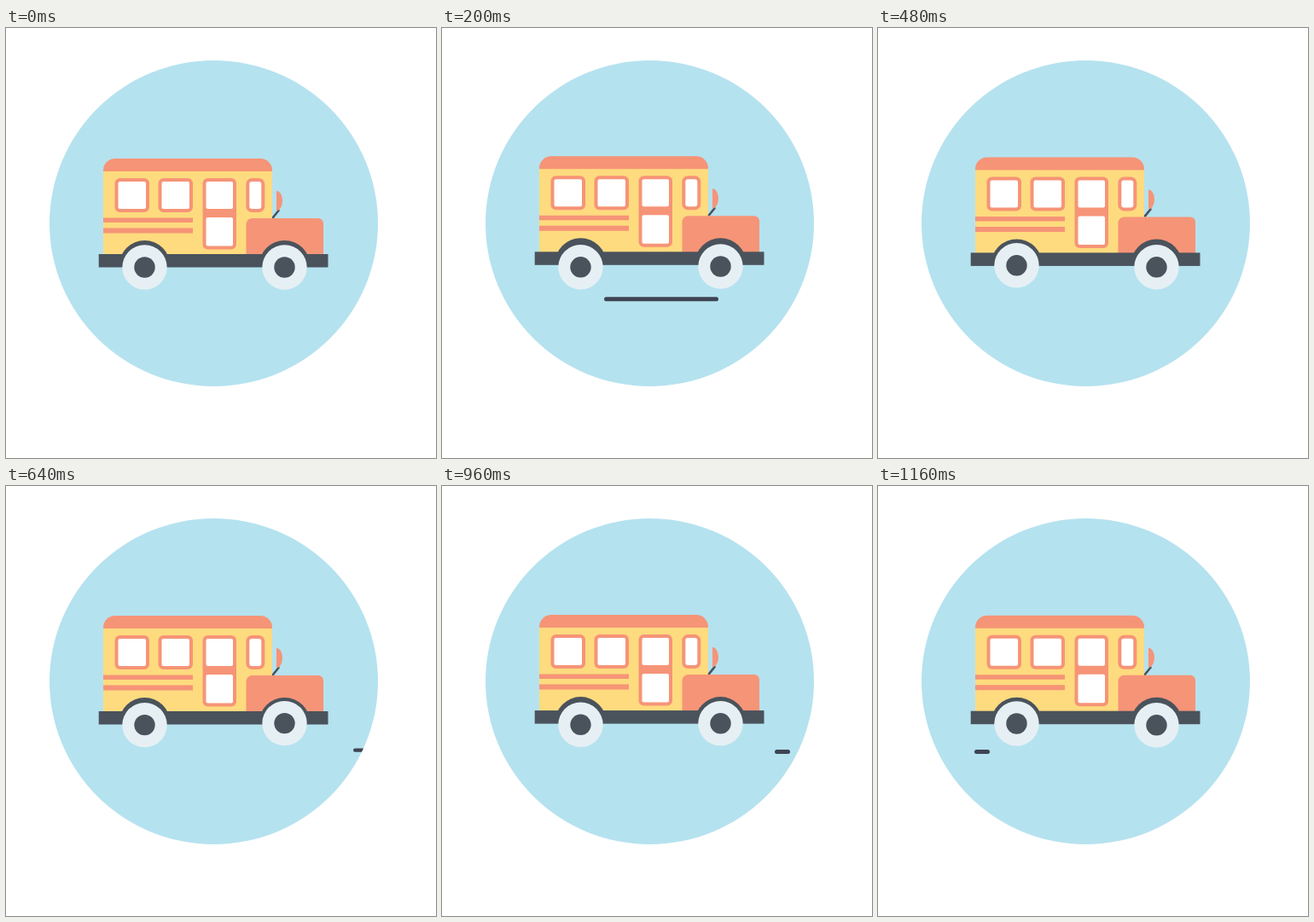
Animation, 504 px wide and 504 px high, one loop 1.2 s. Source, as an HTML page:

```html
<!DOCTYPE html>
<html lang="en">
<head>
<meta charset="utf-8">
<title>School bus</title>
<style>
  html, body { margin: 0; width: 100%; height: 100%; overflow: hidden; background: #fff; }
  svg { display: block; width: 100vw; height: 100vh; }
  .coral { fill: #f69477; }
  .dark { fill: #4a535c; }
  .pane { fill: #fff; stroke: #f69477; stroke-width: 4; }
  .road line { stroke: #3f4453; stroke-linecap: round; }
</style>
</head>
<body>
<svg viewBox="0 0 504 504">
  <defs>
    <clipPath id="disc"><ellipse cx="243.5" cy="229" rx="192.5" ry="191"/></clipPath>
    <g id="wheel">
      <circle r="26.2" fill="#e6f0f4"/>
      <circle class="dark" r="12.2"/>
    </g>
    <path id="arch" class="dark" d="M-30 0A30 30 0 0 1 30 0Z"/>
  </defs>
  <ellipse cx="243.5" cy="229" rx="192.5" ry="191" fill="#b5e2ef"/>
  <g class="road" id="road" clip-path="url(#disc)"></g>
  <g id="body">
    <path fill="#fedb7f" d="M114 167H312V266H114Z"/>
    <path class="coral" d="M114 168V167A14 14 0 0 1 128 153H298A14 14 0 0 1 312 167V168Z"/>
    <rect class="pane" x="129.5" y="178" width="36.5" height="36" rx="4"/>
    <rect class="pane" x="180.5" y="178" width="36.5" height="36" rx="4"/>
    <rect class="coral" x="230.5" y="176" width="39.5" height="83.5" rx="6"/>
    <rect x="234.5" y="180" width="31.5" height="32" rx="2" fill="#fff"/>
    <rect x="234.5" y="222" width="31.5" height="33.5" rx="2" fill="#fff"/>
    <rect class="pane" x="283.3" y="178" width="18" height="36" rx="5"/>
    <path class="coral" d="M114 222.5H219V228H114ZM114 234.5H219V240.5H114Z"/>
    <path d="M313 222L319.5 214" stroke="#4a535c" stroke-width="2.6" stroke-linecap="round"/>
    <path class="coral" d="M317 191A7 11.5 0 0 1 317 214Z"/>
    <path class="coral" d="M281.5 266V230A7 7 0 0 1 288.5 223H366A6 6 0 0 1 372 229V266Z"/>
    <rect class="dark" x="108.7" y="265" width="268.8" height="15.5"/>
    <use href="#arch" x="162.5" y="279"/>
    <use href="#arch" x="326.5" y="279"/>
  </g>
  <use id="rear" href="#wheel"/>
  <use id="front" href="#wheel"/>
</svg>
<script>
const LOOP = 1200, STEP = 40;
const $ = id => document.getElementById(id);

// [time, vertical offset]
const bounce = {
  body: [[0, 0], [200, -2.7], [480, -1.6], [640, -1], [800, -1], [960, -1.9], [1160, -1.3], [1200, 0]],
  rear: [[0, 0], [200, -0.2], [480, -2.2], [640, -0.4], [800, -2.2], [960, -0.7], [1160, -2], [1200, 0]],
  front: [[0, 0], [200, -1], [480, -0.2], [640, -2.4], [800, -0.2], [960, -2.2], [1160, -0.2], [1200, 0]]
};

// Each dash is at x when t = at, and moves left at speed px/ms.
const dashes = [
  { at: 200, x: 190, y: 317.7, len: 134, w: 5, speed: 1.77 },
  { at: 640, x: 407, y: 309.7, len: 134, w: 4.2, speed: 1.77 },
  { at: 960, x: 390, y: 311.5, len: 18, w: 5, speed: 1.385 }
];
for (const d of dashes) {
  d.el = document.createElementNS("http://www.w3.org/2000/svg", "line");
  d.el.setAttribute("x1", d.w / 2);
  d.el.setAttribute("x2", d.len - d.w / 2);
  d.el.setAttribute("stroke-width", d.w);
  $("road").append(d.el);
}

function sample(keys, t) {
  const i = keys.findIndex(k => k[0] > t);
  const [t0, a] = keys[i - 1], [t1, b] = keys[i];
  const p = (t - t0) / (t1 - t0);
  return a + (b - a) * p * p * (3 - 2 * p);
}

const place = (el, x, y) => el.setAttribute("transform", `translate(${x} ${y})`);

function draw(t) {
  place($("body"), 0, sample(bounce.body, t));
  place($("rear"), 162.5, 280.5 + sample(bounce.rear, t));
  place($("front"), 326.5, 280.5 + sample(bounce.front, t));
  for (const d of dashes) place(d.el, d.x - (t - d.at) * d.speed, d.y);
}

const start = performance.now();
function tick() {
  // A small lead keeps the 25 fps steps on time despite frame jitter.
  const t = performance.now() - start + 6;
  draw(Math.floor(t / STEP) * STEP % LOOP);
  requestAnimationFrame(tick);
}
tick();
</script>
</body>
</html>
```
